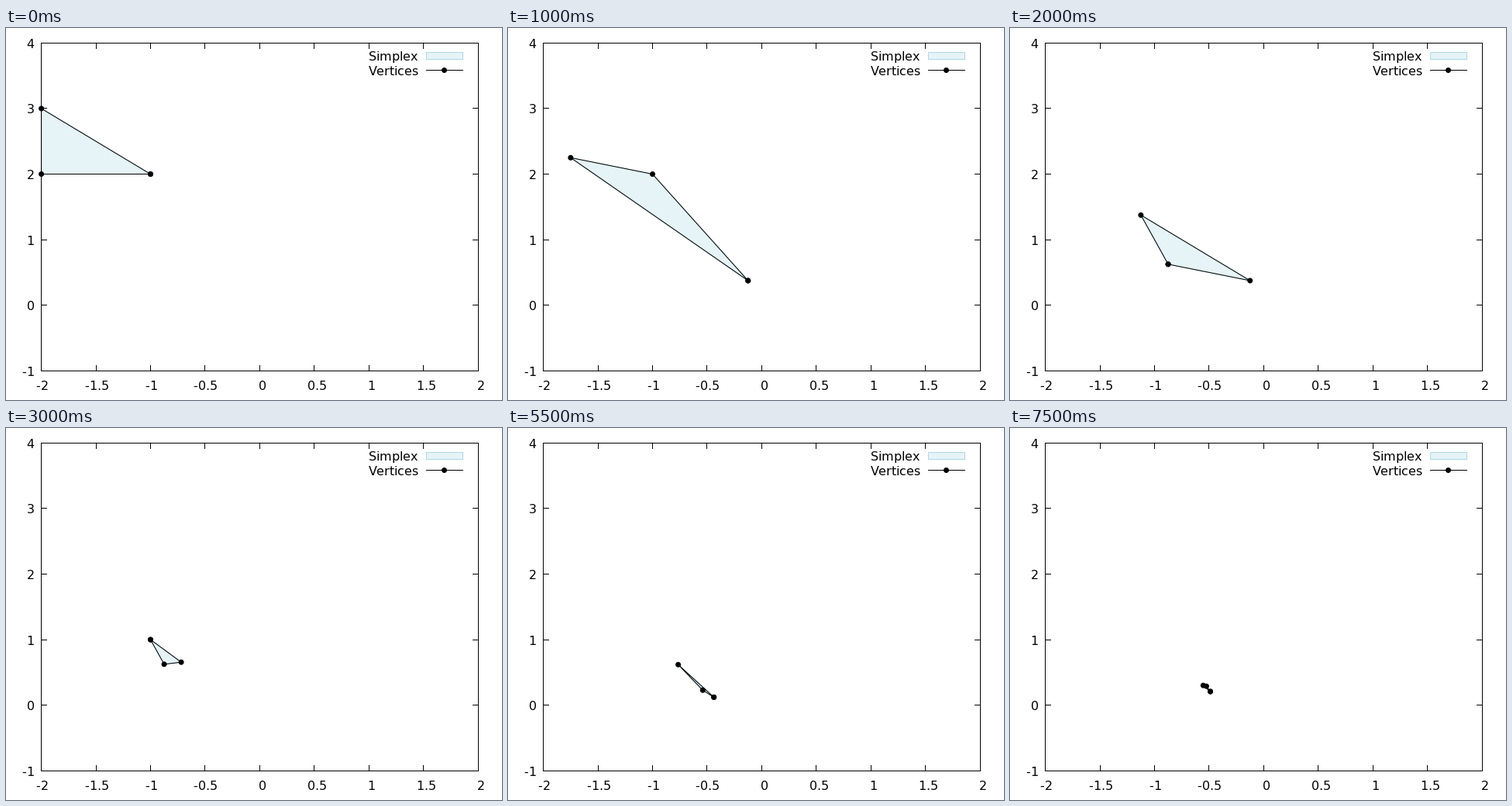
Animation of 640 by 480 pixels, one loop 8 s. Source, as a matplotlib script:

```python
import math

import matplotlib.pyplot as plt
import numpy as np
from matplotlib.animation import FuncAnimation
from matplotlib.patches import Circle

W, H, DPI = 640, 480, 100
FRAMES, INTERVAL = 16, 500
PX = 72 / DPI  # one pixel in points
LEFT, RIGHT, TOP, BOTTOM = 45.5, 609.5, 19.5, 442.5
TICK = 7
FILL, EDGE = "#e6f3f7", "#add8e6"


def to_px(p):
    """Map plot coordinates to stage pixels."""
    x, y = np.asarray(p, float).T
    return np.column_stack([45.6 + (x + 2) * 140.87, 442.3 - (y + 1) * 84.6])


def rosenbrock(p):
    x, y = p
    return (1 - x) ** 2 + 100 * (y - x * x) ** 2


def step(simplex):
    """One Nelder-Mead step; the result is sorted best first."""
    f = rosenbrock
    best, mid, worst = simplex
    center = (best + mid) / 2
    away = center - worst
    reflected, expanded = center + away, center + 2 * away
    contracted = center - away / 2
    if f(reflected) < f(best):
        new = min(expanded, reflected, key=f)
    elif f(reflected) < f(mid):
        new = reflected
    elif f(contracted) < f(worst):
        new = contracted
    else:
        return sorted([best, (best + mid) / 2, (best + worst) / 2], key=f)
    return sorted([best, mid, new], key=f)


start = [np.array(p, float) for p in [(-2, 3), (-2, 2), (-1, 2)]]
history = [sorted(start, key=rosenbrock)]
while len(history) < FRAMES:
    history.append(step(history[-1]))

plt.rcParams["font.family"] = "DejaVu Sans"
fig = plt.figure(figsize=(W / DPI, H / DPI), dpi=DPI, facecolor="white")
ax = fig.add_axes([0, 0, 1, 1])
ax.set_xlim(0, W)
ax.set_ylim(H, 0)
ax.axis("off")


def line(xs, ys, **style):
    return ax.plot(xs, ys, color="black", lw=PX, snap=False, **style)[0]


def area(points, **style):
    return ax.fill(*np.transpose(points), fc=FILL, ec=EDGE, lw=PX,
                   snap=False, **style)[0]


def dot(x, y):
    return ax.add_patch(Circle((x, y), 3.5, fc="black", ec="none",
                               snap=False, zorder=4))


def put(x, y, text):
    return ax.text(x, y, text, fontsize=16 * PX, va="baseline")


def ink_width(text):
    probe = put(0, 0, text)
    width = probe.get_window_extent().width
    probe.remove()
    return width


def advances(text):
    """Kerned letter advances, rounded to whole pixels."""
    return [round(ink_width(f"|{a}{b}|") - ink_width(f"|{b}|"))
            for a, b in zip(text, [*text[1:], ""])]


def label(x, y, text, align):
    """Set text letter by letter on the pixel grid; align is 0 to 1."""
    steps = advances(text)
    x = round(x - align * sum(steps))
    for char, dx in zip(text, steps):
        if char != " ":
            put(x - 0.49, y, char)  # the renderer rounds up from here
        x += dx


def draw_axes():
    line([LEFT, RIGHT, RIGHT, LEFT, LEFT], [TOP, TOP, BOTTOM, BOTTOM, TOP], zorder=5)
    for v in np.arange(-2, 2.5, 0.5):
        exact = to_px([(v, 0)])[0, 0]
        x = math.floor(exact) + 0.5
        line([x, x], [BOTTOM, BOTTOM - TICK], zorder=5)
        line([x, x], [TOP, TOP + TICK], zorder=5)
        label(exact + 1.05, 467, f"{v: g}", 0.5)
    for v in range(-1, 5):
        y = math.floor(to_px([(0, v)])[0, 1]) + 0.5
        line([LEFT, LEFT + TICK], [y, y], zorder=5)
        line([RIGHT, RIGHT - TICK], [y, y], zorder=5)
        label(37, y + 6.5, f"{v: d}", 1)


def draw_legend():
    label(532, 42, "Simplex", 1)
    label(532, 61, "Vertices", 1)
    area([(542.5, 31.5), (589.5, 31.5), (589.5, 40.5), (542.5, 40.5)])
    line([542.5, 589.5], [54.5, 54.5])
    dot(565.5, 54.5)


draw_axes()
draw_legend()
body = area(np.zeros((3, 2)), zorder=2)
outline = line([], [], zorder=3)
dots = [dot(0, 0) for _ in range(4)]


def update(i):
    pts = to_px(history[i])
    loop = np.vstack([pts, pts[:1]])
    body.set_xy(loop)
    outline.set_data(*loop.T)
    for d, p in zip(dots, loop):
        d.center = p
    return body, outline, *dots


anim = FuncAnimation(fig, update, frames=FRAMES, interval=INTERVAL,
                     init_func=lambda: update(0), repeat=True, repeat_delay=0)
plt.show()
```
